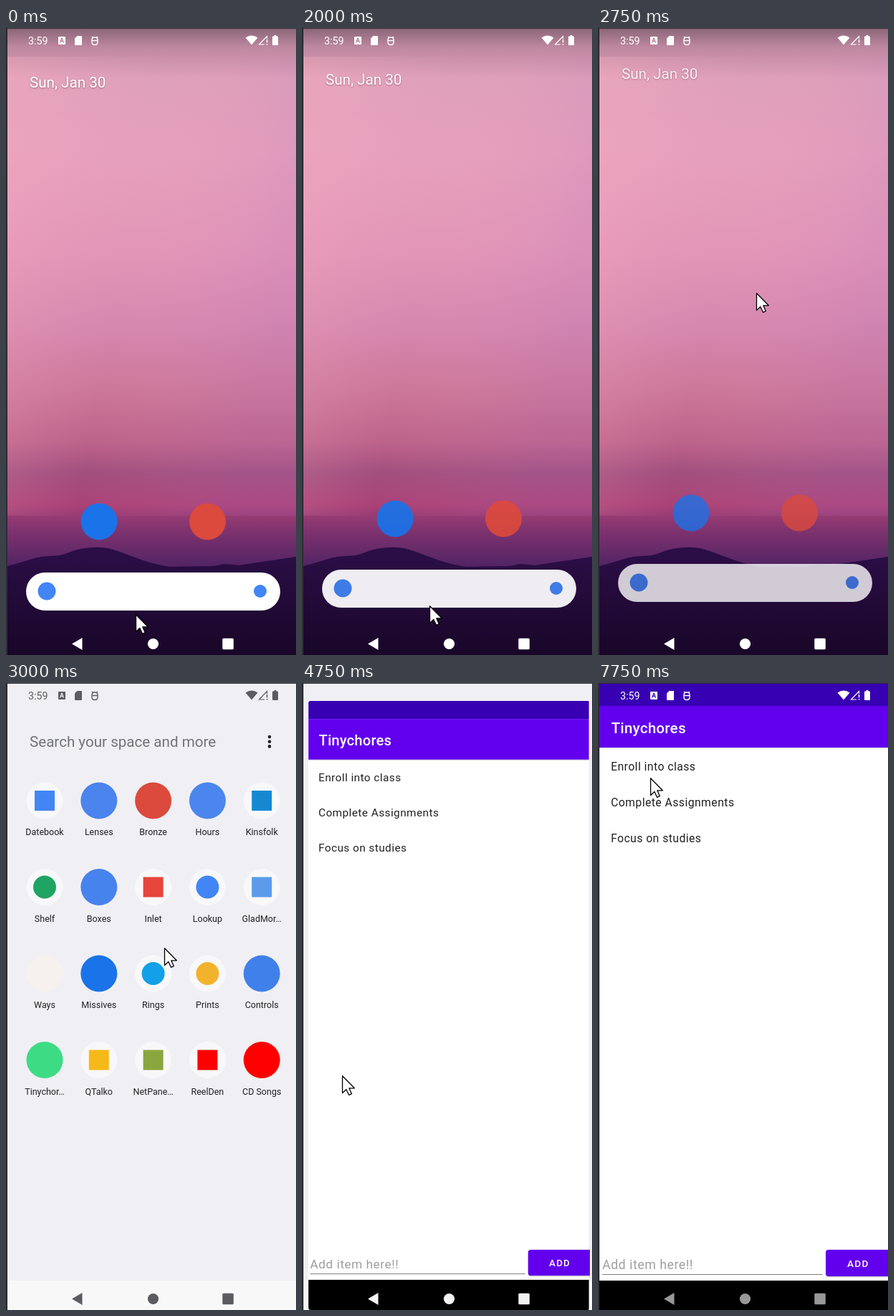
These frames come from a looping animation (405x874 px, 8 s). An HTML page:

```html
<!DOCTYPE html>
<html lang="en">
<head>
<meta charset="utf-8">
<title>Todo demo</title>
<style>
html, body { margin: 0; width: 100%; height: 100%; overflow: hidden; background: #2b2b30; }
svg { display: block; width: 405px; height: 874px; font-family: Roboto, "Noto Sans", sans-serif; }
.label { font-size: 12.5px; text-anchor: middle; fill: #202124; }
.item { font-size: 15.7px; letter-spacing: .48px; fill: #212121; }
.date { font-size: 20.6px; fill: #fff; filter: drop-shadow(0 1px 1px #0005); }
</style>
</head>
<body>
<svg viewBox="0 0 405 874">
  <defs>
    <linearGradient id="sky" x2="0" y2="1">
      <stop offset="0" stop-color="#8a6578"/>
      <stop offset=".03" stop-color="#bd889f"/>
      <stop offset=".08" stop-color="#dfa0ba"/>
      <stop offset=".2" stop-color="#e6a0bc"/>
      <stop offset=".36" stop-color="#e295b7"/>
      <stop offset=".48" stop-color="#d687ae"/>
      <stop offset=".58" stop-color="#cc7799"/>
      <stop offset=".66" stop-color="#bd638a"/>
      <stop offset=".71" stop-color="#a14f7e"/>
      <stop offset=".76" stop-color="#ab4277"/>
      <stop offset=".8" stop-color="#80336f"/>
      <stop offset=".86" stop-color="#502463"/>
    </linearGradient>
    <linearGradient id="side" x2="1" y2=".3">
      <stop offset="0" stop-color="#ffb4c0" stop-opacity=".3"/>
      <stop offset=".5" stop-color="#f0a0c0" stop-opacity="0"/>
      <stop offset="1" stop-color="#b070c0" stop-opacity=".16"/>
    </linearGradient>
    <linearGradient id="hill" x2="0" y2="1">
      <stop offset="0" stop-color="#2c0e48"/>
      <stop offset="1" stop-color="#190628"/>
    </linearGradient>
    <clipPath id="pane"><rect x="9" y="25" width="393" height="849" rx="3"/></clipPath>
  </defs>

  <g id="home">
    <rect width="405" height="874" fill="url(#sky)"/>
    <rect y="40" width="405" height="640" fill="url(#side)"/>
    <path fill="url(#hill)" d="M0 751L40 739C60 734 70 738 85 732C100 726 125 720 150 727C175 735 200 748 230 751L290 750L305 747L325 749L405 737V874H0Z"/>
    <g id="desk">
      <text class="date" x="33" y="83">Sun, Jan 30</text>
      <circle cx="130" cy="688" r="25.5" fill="#1a73e8"/>
      <circle cx="281.5" cy="688" r="25.5" fill="#db4a3d"/>
      <rect x="28" y="759" width="355" height="53" rx="26.5" fill="#fff"/>
      <circle cx="57" cy="785" r="12.5" fill="#4285f4"/>
      <circle cx="355" cy="785" r="9" fill="#4285f4"/>
    </g>
  </g>

  <g id="drawer">
    <rect width="405" height="874" fill="#f0eff4"/>
    <rect y="833" width="405" height="41" fill="#f8f8f9"/>
    <g id="grid">
      <text x="33" y="89" font-size="20.6" fill="#717378">Search your space and more</text>
      <path d="M368 75v0m0 6.7v0m0 6.7v0" stroke="#202124" stroke-width="4.6" stroke-linecap="round"/>
    </g>
  </g>

  <g id="clip">
    <g id="app">
      <rect width="405" height="880" fill="#fff"/>
      <rect y="90" width="405" height="1.5" fill="#0002"/>
      <rect width="405" height="32" fill="#3700b3"/>
      <rect y="32" width="405" height="58" fill="#6200ee"/>
      <text x="18.5" y="70" font-size="20.6" font-weight="500" letter-spacing=".25" fill="#fff">Tinychores</text>
      <text class="item" x="18" y="121.5">Enroll into class</text>
      <text class="item" x="18" y="171.5">Complete Assignments</text>
      <text class="item" x="18" y="221.5">Focus on studies</text>
      <text x="6" y="817" font-size="17.7" letter-spacing=".55" fill="#9e9e9e">Add item here!!</text>
      <rect x="6" y="824" width="308" height="1" fill="#7d7d7d"/>
      <rect x="318" y="791.5" width="92" height="37" rx="4" fill="#0003"/>
      <rect x="318" y="790" width="92" height="37" rx="4" fill="#6200ee"/>
      <text x="348" y="814" font-size="13.7" font-weight="500" letter-spacing="1.25" fill="#fff">ADD</text>
      <rect y="833" width="405" height="60" fill="#000"/>
    </g>
  </g>

  <g id="status">
    <text x="31" y="22.5" font-size="14.2">3:59</text>
    <path fill-rule="evenodd" d="M74 12h8q1 0 1 1v9q0 1-1 1h-8q-1 0-1-1v-9q0-1 1-1zM77.3 13.8L75 20.5h1.3l.5-1.5h2.4l.5 1.5H81L78.7 13.8zM78 15.3l.8 2.5h-1.6z"/>
    <path d="M99.5 11H105q1 0 1 1v11q0 1-1 1h-8q-1 0-1-1v-8.5z"/>
    <path fill="none" stroke="currentColor" stroke-width="1.4" d="M120 12l1.5 1.5M128 12l-1.5 1.5M120 17.5v-1q0-3.5 4-3.5t4 3.5v1zM120 17.5v2q0 4 4 4t4-4v-2"/>
    <path d="M343 23.5L334.5 13.5Q343 7.5 351.5 13.5Z"/>
    <path fill="none" stroke="currentColor" stroke-width="1.2" d="M361 23H353.5L364.5 11.5V15"/>
    <path d="M363.8 16h1.5v4.5h-1.5zm0 6h1.5v1.5h-1.5z"/>
    <path d="M374.5 10h3v1.5h1.5q1 0 1 1V23q0 1-1 1h-6q-1 0-1-1V12.5q0-1 1-1h1.5z"/>
  </g>

  <g id="nav">
    <path d="M92 858.5L106.5 850V867Z"/>
    <circle cx="205.5" cy="858.5" r="7.6"/>
    <rect x="302.3" y="850.8" width="15.5" height="15.5" rx="1.5"/>
  </g>
  <path d="M0 0H405V1H2V874H0Z" fill="#2d2d33"/>
  <path id="cursor" fill="#fff" stroke="#000" stroke-width="1.3" stroke-linejoin="round"
    d="M.5 .8V24.5L5.8 19.5L9.5 27.3L13.3 25.7L9.8 17.8H17.3Z"/>
</svg>
<script>
const $ = id => document.getElementById(id);
const show = (id, on) => $(id).style.display = on ? "" : "none";

// label, disc colour, optional inner colour and shape
const pale = "#f8f8fa";
const apps = [
  ["Datebook", pale, "#4285f4", "square"], ["Lenses", "#4a84ec"], ["Bronze", "#db4a3d"],
  ["Hours", "#4b86ee"], ["Kinsfolk", pale, "#1489d2", "square"],
  ["Shelf", pale, "#1fa463", "circle"], ["Boxes", "#4783ec"], ["Inlet", pale, "#e8453c", "square"],
  ["Lookup", pale, "#4285f4", "circle"], ["GladMor…", pale, "#5b9bea", "square"],
  ["Ways", "#f5f1ef"], ["Missives", "#1a73e8"], ["Rings", pale, "#13a0e8", "circle"],
  ["Prints", pale, "#f2b32c", "circle"], ["Controls", "#4080ea"],
  ["Tinychor…", "#3ddc84"], ["QTalko", pale, "#f6b91a", "square"],
  ["NetPane…", pale, "#8aa63f", "square"], ["ReelDen", pale, "#ff0000", "square"],
  ["CD Songs", "#ff0000"]
];
$("grid").insertAdjacentHTML("beforeend", apps.map(([name, disc, inner, shape], i) => {
  const x = 54 + i % 5 * 75.8, y = 164 + Math.floor(i / 5) * 120.5;
  const mark = shape === "square"
    ? `<rect x="${x - 14}" y="${y - 14}" width="28" height="28" fill="${inner}"/>`
    : shape ? `<circle cx="${x}" cy="${y}" r="16" fill="${inner}"/>` : "";
  return `<circle cx="${x}" cy="${y}" r="25.5" fill="${disc}"/>${mark}
    <text class="label" x="${x}" y="${y + 48.3}">${name}</text>`;
}).join(""));

// start time, then values that hold until the next entry
const cursorPath = [
  [0, 181, 817], [250, 171, 820], [500, -99, 0], [2000, 178, 805], [2250, 205, 560],
  [2750, 221, 369], [3500, 127, 485], [3750, 71, 549], [4000, 56, 547], [6000, 74, 622],
  [6250, 88, 664], [6500, 158, 716], [6750, 153, 786], [7000, 120, 549], [7250, 124, 140],
  [7500, 92, 147], [7750, 73, 132]
];
const swipe = [[0, 0, 1], [2000, -4, .93], [2250, -8, .87], [2750, -12, .79]];
const at = (list, t) => list.findLast(e => e[0] <= t);

function draw(t) {
  const drawer = t >= 3000 && t < 5000, app = t >= 4750, opening = app && t < 5000;
  show("home", t < 3000);
  show("drawer", drawer);
  show("clip", app);
  show("status", !opening);

  const [, lift, alpha] = at(swipe, t);
  $("desk").setAttribute("transform", `translate(0 ${lift})`);
  $("desk").setAttribute("opacity", alpha);
  $("grid").setAttribute("opacity", t < 4500 ? 1 : opening ? 0 : .5);

  $("clip").setAttribute("clip-path", opening ? "url(#pane)" : "none");
  $("app").setAttribute("transform", opening ? "translate(5.4 18.9) scale(.976)" : "");

  const step = Math.min(6, Math.max(0, Math.floor((t - 5000) / 250)));
  const grey = 242 - step * 15;
  const ink = drawer && !app ? "#5c5c60" : "#fff";
  $("status").setAttribute("fill", ink);
  $("status").setAttribute("color", ink);
  $("nav").setAttribute("fill", app ? `rgb(${grey},${grey},${grey})` : ink);

  const [, x, y] = at(cursorPath, t);
  $("cursor").setAttribute("transform", `translate(${x} ${y})`);
}

function tick() {
  draw(performance.now() % 8000);
  requestAnimationFrame(tick);
}
tick();
</script>
</body>
</html>
```
